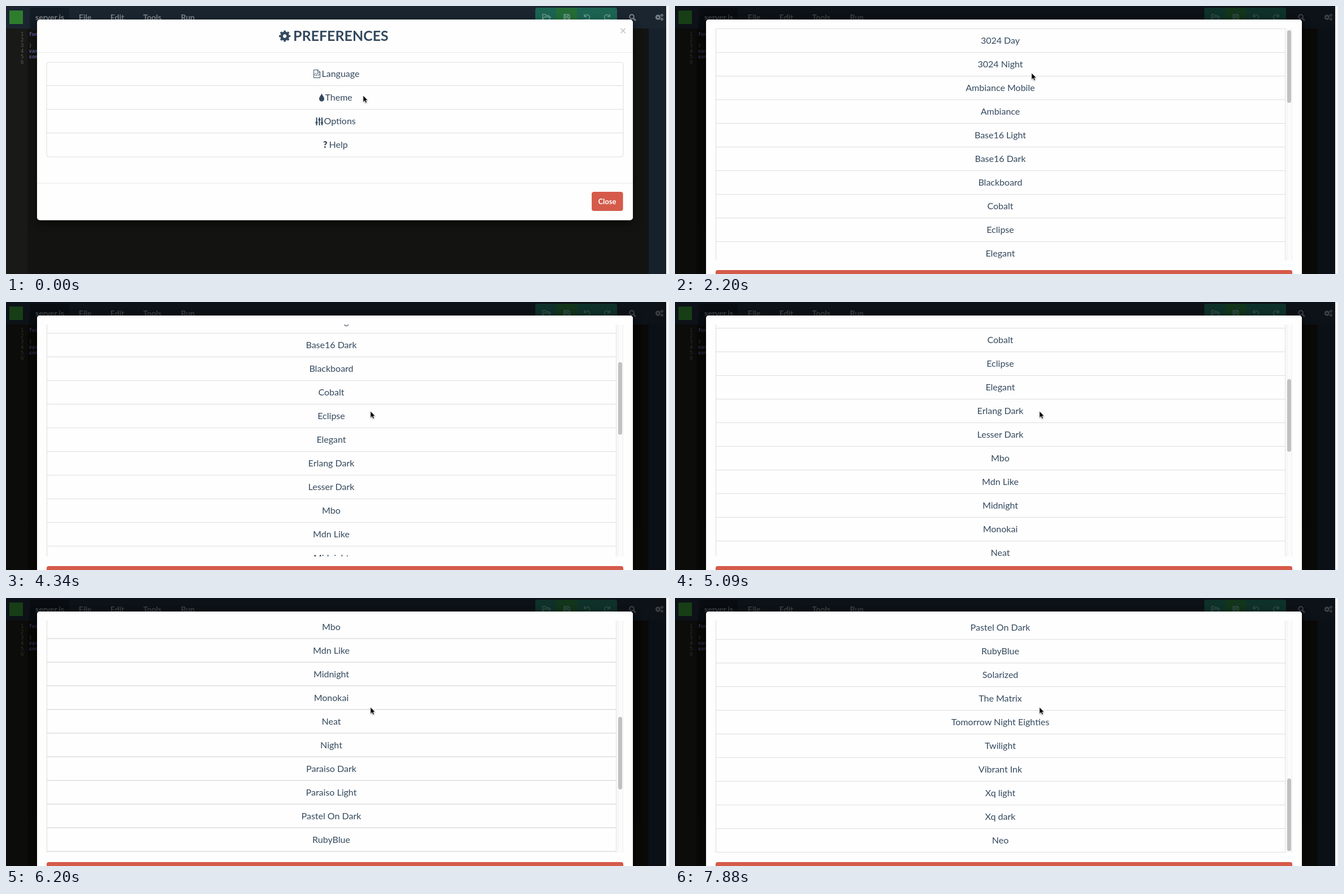
Recreate the animation shown at these times as an HTML page. Size 1175 by 476 pixels, loop 8 s.

```html
<!DOCTYPE html>
<html lang="en">
<head>
<meta charset="utf-8">
<title>Theme preferences</title>
<style>
  html, body { margin: 0; width: 100%; height: 100%; overflow: hidden; background: #131411; }
  svg { display: block; width: 1175px; height: 476px; }
  text { font-family: Lato, sans-serif; font-size: 16px; fill: #34495e; }
  .menu text { font-size: 14px; font-weight: 700; fill: #7d8389; }
  .code text { font: 9px "DejaVu Sans Mono", monospace; fill: #5d5e5a; }
  .code .key { fill: #5b5e9c; font-weight: 700; }
  .mid { text-anchor: middle; }
  .line { fill: none; stroke: #ddd; }
  .ink { fill: #34495e; }
  .pen { fill: none; stroke: #34495e; }
  .panel { fill: #fefefe; filter: drop-shadow(0 5px 7px rgba(0, 0, 0, .5)); }
</style>
</head>
<body>
<svg viewBox="0 0 1175 476">
  <defs>
    <clipPath id="view"><rect x="71" y="40" width="1012" height="412"/></clipPath>
    <g id="cog" fill="none">
      <circle r="5.6" stroke-width="4.8"/>
      <circle r="8.6" stroke-width="3" pathLength="16" stroke-dasharray="1" stroke-dashoffset=".5"/>
    </g>
    <path id="turn" d="M-4.4-1.5A4.6 4.6 0 1 1-3.4 3.4M-5-5.5V-1.2H-.7"/>
  </defs>

  <!-- editor -->
  <rect width="1175" height="476" fill="#131411"/>
  <rect y="40" width="38" height="436" fill="#191917"/>
  <rect x="1139" y="40" width="31" height="436" fill="#17212c"/>
  <rect width="1170" height="40" fill="#1a2530"/>
  <rect x="6" y="8" width="24" height="24" fill="#2e7d2d"/>
  <rect x="42" y="3" width="70" height="40" rx="5" fill="#131b24"/>
  <g class="menu">
    <text x="52" y="25">server.js</text><text x="129" y="25">File</text><text x="185" y="25">Edit</text>
    <text x="243" y="25">Tools</text><text x="310" y="25">Run</text>
  </g>
  <rect x="938" y="3" width="145" height="34" rx="4" fill="#1c6352"/>
  <rect x="975" y="3" width="37" height="34" fill="#246b36"/>
  <g fill="none" stroke="#6d9a8e" stroke-width="1.5">
    <path d="M951 24V15H956L957 17H962V19M951 25L954 19.500H965L962 25Z"/>
    <path d="M989 15H997L999 17V25H989ZM991 15V18.500H996V15M991 25V21H997V25"/>
    <use href="#turn" x="1030" y="20"/>
    <use href="#turn" transform="translate(1065 20)scale(-1 1)"/>
  </g>
  <g fill="none" stroke="#7d8389">
    <path d="M1112 22L1116 26" stroke-width="2.500"/>
    <circle cx="1109" cy="19" r="3.800" stroke-width="2"/>
    <use href="#cog" transform="translate(1155.500 20)scale(.5)"/>
    <use href="#cog" transform="translate(1162.500 16.500)scale(.27)"/>
    <use href="#cog" transform="translate(1162.500 23.500)scale(.27)"/>
  </g>
  <g class="code" id="code"></g>
  <rect id="shade" width="1170" height="476"/>
  <rect x="1170" width="5" height="476" fill="#f7f7f7"/>

  <!-- preferences dialog -->
  <g id="prefs">
    <rect class="panel" x="55" y="24" width="1056" height="356.500" rx="5"/>
    <use href="#cog" x="494" y="53.500" stroke="#34495e"/>
    <text x="509" y="62" style="font-size:25px;font-weight:700">PREFERENCES</text>
    <text class="mid" x="1093.500" y="51" style="font-size:20px;font-weight:700;fill:#ccc">×</text>
    <path class="line" d="M55 82.500H1111M55 314.500H1111" style="stroke:#e8e8e8"/>
    <rect class="line" x="72" y="100" width="1022" height="168" rx="4"/>
    <path class="line" d="M72 141.500H1094M72 183.500H1094M72 225.500H1094"/>
    <path class="pen" d="M545.500 113.500H553L556.500 117V127.500H545.500ZM552.500 113.500V117.500H556.500M549 119L547 121.500 549 124M553 119L555 121.500 553 124M551.500 118.500L550.500 124.500"/>
    <path class="ink" d="M559.500 155C560.500 159 564 161 564 165A4.500 4.500 0 0 1 555 165C555 161 558.500 159 559.500 155Z"/>
    <path class="pen" stroke-width="2" d="M550.500 198V212M555.500 198V212M560 198V212"/>
    <path class="pen" stroke-width="2.500" d="M548.500 207H552.500M553.500 202H557.500M558 207.500H562"/>
    <text x="562" y="252" style="font-weight:900">?</text>
    <text x="559.500" y="126">Language</text><text x="565.500" y="168">Theme</text>
    <text x="563.500" y="210">Options</text><text x="572.500" y="252">Help</text>
    <rect x="1038" y="330" width="55.500" height="34" rx="4" fill="#d55a4a"/>
    <text class="mid" x="1065.500" y="352" style="font-size:13px;font-weight:700;fill:#fff">Close</text>
  </g>

  <!-- theme dialog -->
  <g id="themes">
    <rect class="panel" x="55" y="24" width="1056" height="520" rx="5"/>
    <rect x="1083" y="40" width="11" height="412" fill="#fbfbfb"/>
    <path class="line" d="M1084.500 40V452M1093.500 40V452" style="stroke:#eee"/>
    <g clip-path="url(#view)"><g id="list"></g></g>
    <rect id="thumb" x="1085" width="7" height="129" rx="3.500" fill="#c1c1c1"/>
    <rect x="72" y="469" width="1022" height="44" rx="4" fill="#d55a4a"/>
  </g>

  <path id="pointer" d="M0 0V11.500L2.700 9.200 4.500 13.200 6.500 12.300 4.800 8.400H8.200Z" stroke="#fff" stroke-width=".7"
        style="filter:drop-shadow(0 1px 1px rgba(0,0,0,.35))"/>
</svg>
<script>
const LOOP = 8000, ROW = 42;
const $ = id => document.getElementById(id);
const clamp = v => Math.min(1, Math.max(0, v));
const move = (el, x, y) => el.setAttribute('transform', `translate(${x} ${y})`);

const names = ['3024 Day', '3024 Night', 'Ambiance Mobile', 'Ambiance', 'Base16 Light', 'Base16 Dark',
  'Blackboard', 'Cobalt', 'Eclipse', 'Elegant', 'Erlang Dark', 'Lesser Dark', 'Mbo', 'Mdn Like', 'Midnight',
  'Monokai', 'Neat', 'Night', 'Paraiso Dark', 'Paraiso Light', 'Pastel On Dark', 'RubyBlue', 'Solarized',
  'The Matrix', 'Tomorrow Night Eighties', 'Twilight', 'Vibrant Ink', 'Xq light', 'Xq dark', 'Neo'];
$('list').innerHTML = names.map((name, i) => `
  <rect class="line" x="72.5" y="${40.5 + i * ROW}" width="1009" height="${ROW}"/>
  <text class="mid" x="576.5" y="${67 + i * ROW}">${name}</text>`).join('');

$('code').innerHTML = ['function', '', '}', 'var', 'some', ''].map((word, i) => `
  <text x="26" y="${52.5 + i * 10}">${i + 1}</text>
  <text x="40.5" y="${52.5 + i * 10}" class="${word === '}' ? '' : 'key'}">${word}</text>`).join('');

// [time, scroll offset, jumps until the next key]
const scrollKeys = [[0, 0, 1], [3180, 25, 3], [3530, 102, 4], [4130, 176, 1], [4340, 195, 5], [5090, 288, 2],
  [5360, 353, 1], [5530, 385, 4], [6200, 514.5, 3], [6560, 599, 1], [6700, 628, 3], [7090, 713, 4],
  [7730, 822, 1], [7880, 849, 1], [LOOP, 849, 1]];
// [time, x, y]
const pointerKeys = [[0, 633, 159], [1140, 633, 159], [1300, 646, 171], [1720, 560, 150], [2200, 632, 119],
  [2420, 613, 96], [2910, 646, 194], [LOOP, 646, 194]];

function span(keys, t) {
  const i = keys.findIndex(k => k[0] > t);
  const a = keys[i - 1], b = keys[i];
  return [a, b, (t - a[0]) / (b[0] - a[0])];
}

function scrollAt(t) {
  const [a, b, p] = span(scrollKeys, t);
  return a[1] + (b[1] - a[1]) * Math.floor(p * a[2] + 1e-6) / a[2];
}

function pointerAt(t) {
  const [a, b, p] = span(pointerKeys, t);
  const e = (1 - Math.cos(p * Math.PI)) / 2;
  return [1, 2].map(k => a[k] + (b[k] - a[k]) * e);
}

function draw(t) {
  // the dialog opens in eleven steps, 100 ms apart
  const open = clamp(Math.floor((t + 70) / 100) / 11);
  const slide = clamp((open - .3) / .7);
  $('shade').setAttribute('opacity', .5 * clamp(open / .4));
  $('themes').setAttribute('opacity', clamp(slide * 2));
  move($('themes'), 0, -130 * (1 - slide) ** 2);

  const y = scrollAt(t);
  move($('list'), 0, -y);
  $('thumb').setAttribute('y', 43 + y * 412 / 1261);
  move($('pointer'), ...pointerAt(t));
}

function tick() {
  draw(performance.now() % LOOP);
  requestAnimationFrame(tick);
}
tick();
</script>
</body>
</html>
```
